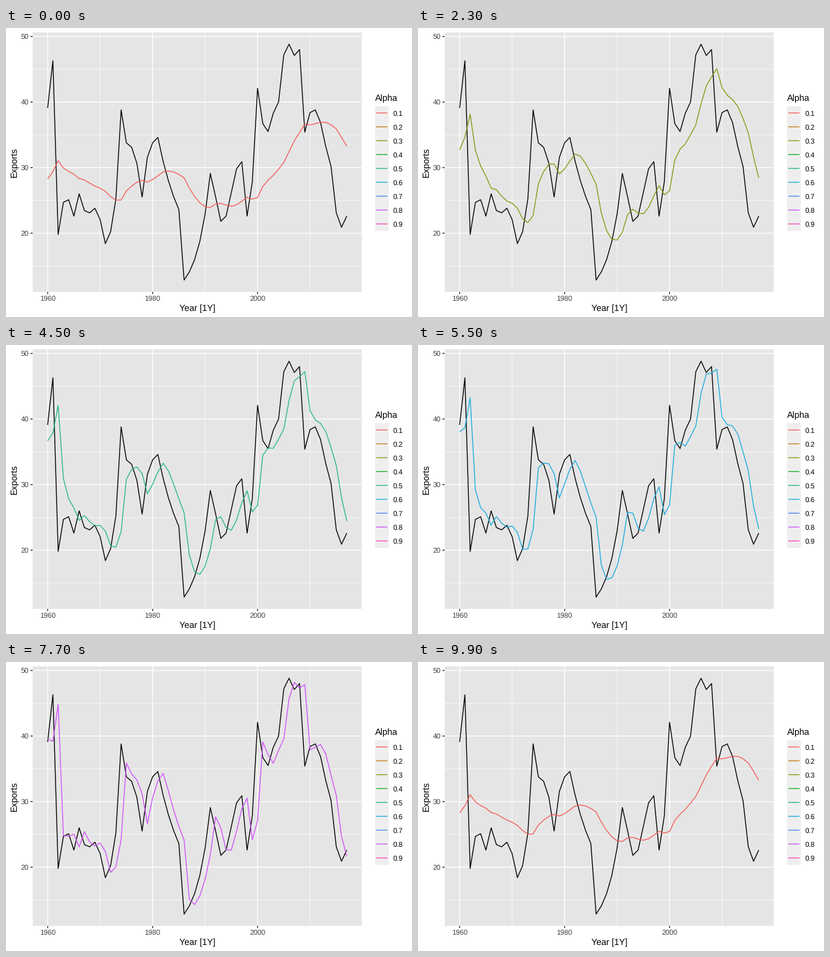
Animation of 672 by 480 pixels, one loop 10 s. Source, as a matplotlib script:

```python
import numpy as np
import matplotlib.pyplot as plt
from matplotlib.animation import FuncAnimation
from matplotlib.patches import Rectangle

plt.rcParams.update({"font.family": "Liberation Sans", "text.hinting": "none"})

W, H, DPI = 672, 480, 96
LEFT, RIGHT, TOP, BOTTOM = 44.2, 588.8, 7.33, 438.3
LINE = 1.067  # points
TICK = 3.67   # pixels

ALPHAS = [k / 10 for k in range(1, 10)]
COLORS = ["#F35E5A", "#C47F14", "#839C13", "#17B12B", "#2AB88E",
          "#1DADDD", "#5086FF", "#D052FA", "#FD41B6"]

# Swings of the series: (years, level reached, bend);
# a negative bend starts fast, a positive one starts slowly.
SWINGS = [
    (1, 46.3), (1, 19.8), (2, 25.1, -5), (1, 22.6), (1, 26), (2, 23.1, -4),
    (1, 23.8), (2, 18.4, 1.5), (3, 38.8, 3), (2, 33.1, -4), (2, 25.5, 1.5),
    (3, 34.6, -3), (4, 23.6, -0.8), (1, 12.84), (5, 29.1, 2), (2, 21.8),
    (2, 26.2, 3), (2, 30.9, -2.4), (1, 22.6), (2, 42.1, 2), (2, 35.5, -3),
    (2, 40, -1), (2, 48.82, -3), (1, 47.1), (1, 48), (1, 35.4),
    (2, 38.8, -4), (2, 33.2, 1.3), (2, 23.1, 1.7), (1, 20.9), (1, 22.6)]


def trace(start, swings):
    values = [start]

    def swing(years, level, bend=0.1):
        t = np.arange(1, years + 1) / years
        ease = np.expm1(bend * t) / np.expm1(bend)
        values.extend(values[-1] + (level - values[-1]) * ease)

    for args in swings:
        swing(*args)
    return np.array(values)


EXPORTS = trace(39.1, SWINGS)
YEARS = 1960 + np.arange(len(EXPORTS))


def scaler(data, first, last):
    """Map data to pixels with 5 % padding on both sides."""
    pad = 0.05 * np.ptp(data)
    ends = [data.min() - pad, data.max() + pad]
    pixels = [first, last]
    return lambda v: np.interp(v, ends, pixels)


px = scaler(YEARS, LEFT, RIGHT)
py = scaler(EXPORTS, BOTTOM, TOP)


def smooth(alpha):
    """One-step exponential smoothing with the least-squares initial level."""
    n = len(EXPORTS)
    base = np.zeros(n)
    for t in range(1, n):
        base[t] = alpha * EXPORTS[t - 1] + (1 - alpha) * base[t - 1]
    decay = (1 - alpha) ** np.arange(n)
    level = decay @ (EXPORTS - base) / (decay @ decay)
    return base + level * decay


fig = plt.figure(figsize=(W / DPI, H / DPI), dpi=DPI, facecolor="white")
ax = fig.add_axes([0, 0, 1, 1])
ax.set_xlim(0, W)
ax.set_ylim(H, 0)
ax.axis("off")


def stroke(xs, ys, color, width=LINE):
    line, = ax.plot(xs, ys, color=color, lw=width, snap=False,
                    solid_capstyle="butt", solid_joinstyle="round")
    return line


def box(x, y, w, h, color):
    ax.add_patch(Rectangle((x, y), w, h, fc=color, ec="none", lw=0, snap=False))


def label(x, y, text, size=8.8, color="black", ha="left", **kw):
    ax.text(x, y, text, size=size, color=color, ha=ha, va="baseline", **kw)


# Panel and grid: thin lines halfway between the labelled ones
box(LEFT, TOP, RIGHT - LEFT, BOTTOM - TOP, "#E5E5E5")
for width, y0, x0 in ((LINE / 2, 15, 1970), (LINE, 20, 1960)):
    for v in range(y0, 51, 10):
        stroke([LEFT, RIGHT], [py(v)] * 2, "white", width)
    for v in range(x0, 2011, 20):
        stroke([px(v)] * 2, [TOP, BOTTOM], "white", width)

# Axes
for v in range(20, 51, 10):
    stroke([LEFT - TICK, LEFT], [py(v)] * 2, "#272727")
    label(37.6, py(v) + 4.3, str(v), color="#404040", ha="right")
for v in range(1960, 2001, 20):
    stroke([px(v)] * 2, [BOTTOM, BOTTOM + TICK], "#272727")
    label(px(v), 453.3, str(v), color="#404040", ha="center")
label((LEFT + RIGHT) / 2, 469.8, "Year [1Y]", 11, ha="center")
label(17.9, (TOP + BOTTOM) / 2, "Exports", 11, ha="center",
      rotation=90, rotation_mode="anchor")

# Legend
KEY, KEY_X, KEY_Y = 23.04, 610.7, 129.6
label(KEY_X, 120.8, "Alpha", 11)
box(KEY_X, KEY_Y, KEY, KEY * len(ALPHAS), "#EEEEEE")
for i, (alpha, color) in enumerate(zip(ALPHAS, COLORS)):
    y = KEY_Y + (i + 0.5) * KEY
    stroke([KEY_X + 0.1 * KEY, KEY_X + 0.9 * KEY], [y, y], color)
    label(641, y + 4.3, f"{alpha:.1f}")

# Series
xs = px(YEARS)
stroke(xs, py(EXPORTS), "black")
curves = [py(smooth(alpha)) for alpha in ALPHAS]
fitted = stroke(xs, curves[0], COLORS[0])

# Each alpha holds for 11 frames; the early ones run one frame late
starts = [11 * k + (1 < k < 5) for k in range(len(ALPHAS) + 1)]


def update(frame):
    k = (np.searchsorted(starts, frame, side="right") - 1) % len(ALPHAS)
    fitted.set_ydata(curves[k])
    fitted.set_color(COLORS[k])
    return fitted,


anim = FuncAnimation(fig, update, frames=100, interval=100,
                     repeat=True, repeat_delay=0, blit=False)
plt.show()
```
